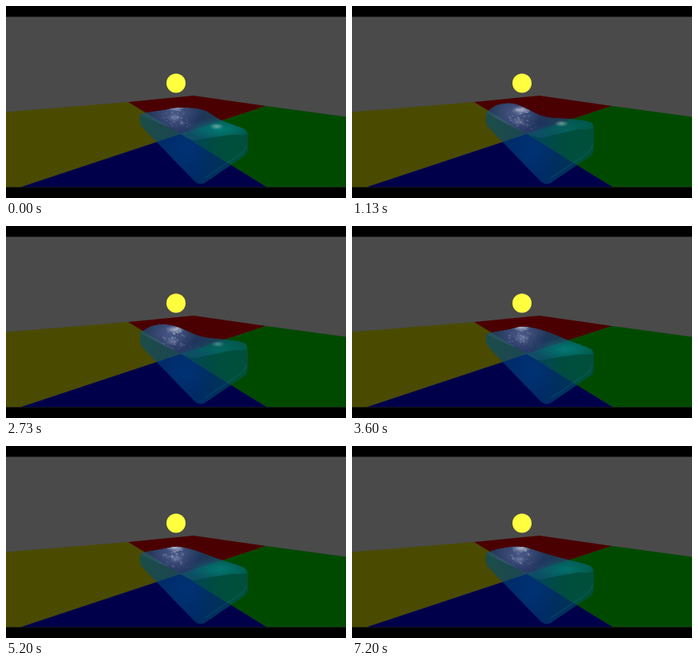
An HTML page with a canvas that plays this animation: 426 by 240 pixels, repeating every 7270 ms.

```html
<!DOCTYPE html>
<html>
<head>
<meta charset="utf-8">
<style>
html, body { margin: 0; width: 100%; height: 100%; overflow: hidden; background: #000; }
canvas { display: block; width: 100%; height: 100%; }
</style>
</head>
<body>
<canvas id="stage" width="426" height="240"></canvas>
<script>
const ctx = document.getElementById('stage').getContext('2d');
const LOOP = 7270, FPS = 15;

// Back edge of the water: x, resting y, displacement of the sloshing mode
const EDGE = [
  [168, 134, -1], [176, 130, -4], [185, 128, -5.5], [198, 126, -5],
  [210, 125, -1], [222, 127.5, 2], [235, 132, 5], [250, 136.5, 4],
  [265, 140.5, 0], [280, 144, -3], [295, 148, -5], [301, 151, -5.5], [303, 156, -4.5]
];

let seed = 11;
const random = () => (seed = seed * 16807 % 2147483647) / 2147483647;
const glints = Array.from({ length: 130 }, () => ({
  u: random() * 2 - 1, v: random(), size: 0.4 + random() * 1.1,
  phase: random() * 6.28, rate: 3 + random() * 5
}));

function polygon(color, ...points) {
  ctx.fillStyle = color;
  ctx.beginPath();
  for (const [x, y] of points) ctx.lineTo(x, y);
  ctx.fill();
}

function glow(x, y, rx, ry, color, alpha) {
  ctx.save();
  ctx.translate(x, y);
  ctx.scale(rx, ry);
  const g = ctx.createRadialGradient(0, 0, 0, 0, 0, 1);
  g.addColorStop(0, `rgba(${color},${alpha})`);
  g.addColorStop(1, `rgba(${color},0)`);
  ctx.fillStyle = g;
  ctx.fillRect(-1, -1, 2, 2);
  ctx.restore();
}

function fillAcross(path, ...colors) {
  const g = ctx.createLinearGradient(168, 0, 303, 0);
  colors.forEach((color, i) => g.addColorStop(i / (colors.length - 1), color));
  ctx.fillStyle = g;
  ctx.fill(path);
}

function drawRoom() {
  ctx.fillStyle = '#4a4a4a';
  ctx.fillRect(0, 0, 426, 240);
  const mid = [219, 160], left = [153, 120], right = [326, 125];
  polygon('#4a4a00', [0, 132.5], left, mid, [18, 226.5], [0, 226.5]);
  polygon('#4a0000', left, [235, 112], right, mid);
  polygon('#004a00', right, [426, 138.5], [426, 226.5], [327, 226.5], mid);
  polygon('#00004a', [18, 226.5], mid, [327, 226.5]);
  ctx.fillStyle = '#ffff40';
  ctx.beginPath();
  ctx.arc(213, 96.5, 12, 0, 7);
  ctx.fill();
  ctx.fillStyle = '#000';
  ctx.fillRect(0, 0, 426, 13.5);
  ctx.fillRect(0, 226.5, 426, 14);
}

function traceEdge(path, points) {
  path.moveTo(...points[0]);
  for (let i = 1; i < points.length - 1; i++) {
    const [x, y] = points[i], [nx, ny] = points[i + 1];
    path.quadraticCurveTo(x, y, (x + nx) / 2, (y + ny) / 2);
  }
  path.lineTo(...points[points.length - 1]);
}

function drawWater(t) {
  const splash = Math.exp(-4 * t);
  const slosh = Math.cos(2 * Math.PI * (t - 1.13) / 1.62) * Math.exp((1.13 - t) / 5) - 0.3 * splash;
  const chop = x => 0.7 * Math.sin(x * 0.5 + t * 5) * Math.exp(-t / 4);
  const edge = EDGE.map(([x, y, d]) => [x, y + d * slosh + chop(x)
    + splash * (2 * Math.exp(-(((x - 210) / 18) ** 2)) - 4 * Math.exp(-(((x - 247) / 10) ** 2)))]);
  const [lx, ly] = edge[0], [rx, ry] = edge[EDGE.length - 1];
  const rimY = 167 - 2 * slosh;

  const body = new Path2D();
  traceEdge(body, edge);
  body.lineTo(303, 179);
  body.quadraticCurveTo(303, 185, 298, 188);
  body.lineTo(251, 220);
  body.quadraticCurveTo(244, 226, 236, 219);
  body.lineTo(171, 152);
  body.quadraticCurveTo(167, 147, 167.5, 140);
  body.closePath();

  const top = new Path2D();
  traceEdge(top, edge);
  top.quadraticCurveTo(rx - 3, ry + 3, 284, 158 - 4 * slosh);
  top.quadraticCurveTo(250, rimY - 3, 237, rimY);
  top.quadraticCurveTo(227, rimY - 1, 207, 153 + slosh);
  top.quadraticCurveTo(176, 140 - slosh, lx, ly);

  ctx.save();
  ctx.clip(body);
  fillAcross(body, 'rgba(0,78,115,.62)', 'rgba(0,70,128,.62)',
    'rgba(0,68,120,.62)', 'rgba(0,80,100,.62)', 'rgba(0,82,92,.62)');
  glow(228, 180, 30, 34, '0,80,160', 0.22);

  // Far lower rim seen through the water
  ctx.lineWidth = 1.5;
  ctx.strokeStyle = 'rgba(30,130,150,.2)';
  ctx.beginPath();
  ctx.moveTo(249, 215);
  ctx.lineTo(295, 184);
  ctx.quadraticCurveTo(300, 180, 301, 173);
  ctx.stroke();

  ctx.clip(top);
  fillAcross(top, 'rgba(75,100,150,.2)', 'rgba(85,100,170,.24)', 'rgba(30,100,150,.2)', 'rgba(0,110,120,.2)');
  glow(268, 154, 42, 15, '0,160,155', 0.38 - 0.2 * slosh);
  glow(210 - 5 * slosh, 134, 32, 22, '145,160,215', 0.3);
  glow(240, 144 + 3 * slosh, 22, 9, '20,40,90', 0.15 + 0.15 * Math.abs(slosh));
  glow(212, 128 + 2 * slosh, 12, 5, '245,245,250', 0.6);
  glow(211 + 3 * Math.sin(t * 4), 142 + 3 * slosh, 9, 5, '215,225,250', 0.28);
  const spray = Math.max(0, slosh) + splash;
  glow(264 + 2 * Math.sin(t * 5), 149 - 2 * slosh, 9, 4, '210,225,215', Math.min(0.5, 0.5 * spray));

  for (const { u, v, size, phase, rate } of glints) {
    const wave = Math.sin(t * rate + phase);
    const alpha = Math.max(0, wave) * (1 - v * 0.65) * (1 - Math.abs(u) * 0.6);
    ctx.fillStyle = `rgba(225,232,250,${alpha * 0.5})`;
    ctx.beginPath();
    ctx.ellipse(211 + u * (10 + 12 * v) + wave, 126 + v * 27 + slosh * 2,
      size * 1.3, size * 0.7, 0.4, 0, 7);
    ctx.fill();
  }
  ctx.restore();
}

function frame() {
  const t = Math.floor((performance.now() % LOOP) * FPS / 1000 + 0.01) / FPS;
  drawRoom();
  drawWater(t);
  requestAnimationFrame(frame);
}
frame();
</script>
</body>
</html>
```
